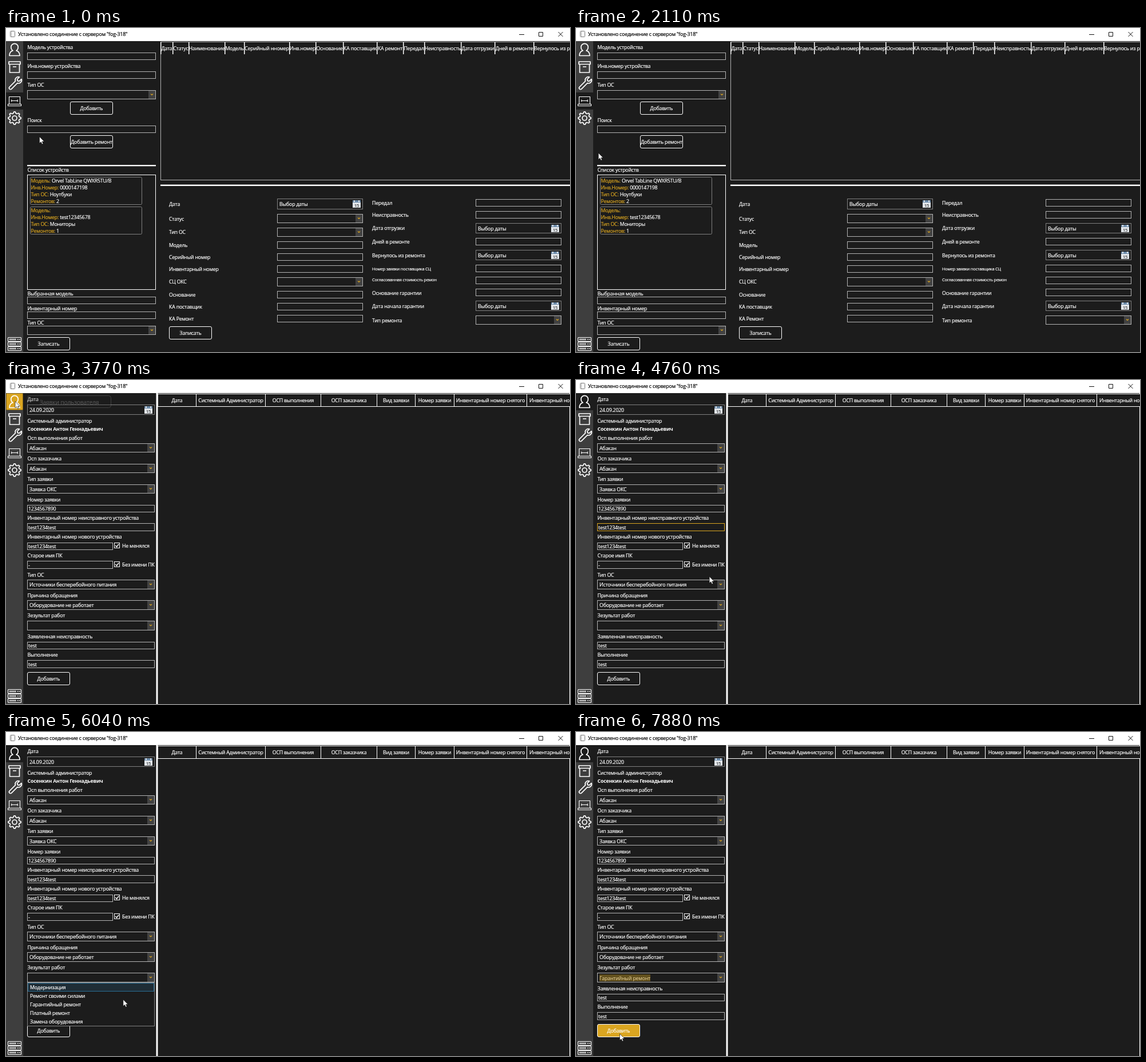
These frames come from a looping animation (986 by 568 pixels, 8000 ms). An HTML page:

```html
<!DOCTYPE html>
<html lang="ru">
<head>
<meta charset="utf-8">
<style>
html, body { margin: 0; width: 100%; height: 100%; overflow: hidden; background: #1c1c1c }
svg { display: block; font: 8.8px "Open Sans", "Noto Sans", sans-serif; letter-spacing: -.2px }
text { fill: #fff; stroke: #fff; stroke-width: .2px; white-space: pre }
.field { fill: #1c1c1c; stroke: #b4b4b4 }
.dim { fill: #1c1c1c; stroke: #808080 }
.btn { fill: #1c1c1c; stroke: #fff }
.gold { fill: #daa520; stroke: #daa520 }
.icon { fill: none; stroke: #fff; stroke-width: 1.7; stroke-linejoin: round }
.thin { stroke-width: 1.1 }
.hot { stroke: #daa520 }
.btn.hot { fill: #daa520; stroke: #fff }
.nav { fill: none }
.nav.hot { fill: #daa520; stroke: none }
</style>
</head>
<body>
<svg id="stage" width="986" height="568" viewBox="0 0 986 568"></svg>
<script>
const fill = (x, y, x2, y2, color, more = '') =>
  `<rect x="${x}" y="${y}" width="${x2 - x}" height="${y2 - y}" fill="${color}" ${more}/>`;
const frame = (x, y, x2, y2, cls = 'field', more = '') =>
  `<rect x="${x + .5}" y="${y + .5}" width="${x2 - x - 1}" height="${y2 - y - 1}" class="${cls}" ${more}/>`;
const path = (d, more = 'class="icon"') => `<path d="${d}" ${more}/>`;
// y is the vertical middle of the capitals
const text = (x, y, s, more = '') => `<text x="${x}" y="${y + 3}" ${more}>${s}</text>`;
const middle = 'text-anchor="middle"';

const input = (x, y, x2, y2, s = '') => frame(x, y, x2, y2, 'field hover') + text(x + 2, (y + y2) / 2 + .5, s);
const combo = (x, y, x2, y2, s = '') => {
  const m = (y + y2) / 2;
  return frame(x, y, x2, y2, 'field hover') + fill(x2 - 13, y + 1, x2 - 1, y2 - 1, '#424242') +
    path(`M${x2 - 9} ${m - 1.5}l2 2 2-2`, 'fill="none" stroke="#daa520" stroke-width="1.1"') + text(x + 4, m + .5, s);
};
const date = (x, y, x2, y2, s = 'Выбор даты') => {
  const cx = x2 - 18, cy = y + 3;
  return frame(x, y, x2, y2, 'dim') + fill(cx, cy, cx + 14, cy + 13, '#e2e6ea') + fill(cx, cy, cx + 14, cy + 4, '#6f8dab') +
    fill(cx + 2, cy, cx + 4, cy + 3, '#e2e6ea') + fill(cx + 10, cy, cx + 12, cy + 3, '#e2e6ea') +
    text(cx + 7, cy + 8.5, '15', middle + ' style="fill:#333;stroke:#333;font-size:7.5px"') +
    text(x + 4, (y + y2) / 2 + .5, s);
};
const button = (x, y, x2, y2, s) =>
  frame(x, y, x2, y2, 'btn hover', 'rx="2.5"') + text((x + x2) / 2, (y + y2) / 2 + .5, s, middle);
const check = (y, s) => frame(189, y, 199, y + 10, 'btn') +
  path(`M191.3 ${y + 5}l2.2 2.6 3.6-5`, 'fill="none" stroke="#fff" stroke-width="1.5"') + text(203, y + 5.5, s);
const labels = (x, list) => list.map(([y, s]) => text(x, y, s)).join('');
const headers = (edges, names, pad, cell) => names.map((s, i) => {
  const a = edges[i], b = edges[i + 1], last = i == names.length - 1;
  return cell(a, b) + text(last ? a + pad : (a + b) / 2 + .5, 35.5, s, last ? '' : middle);
}).join('');
const card = (y, rows) => frame(42, y, 238, y + 49, 'dim', 'rx="2"') +
  rows.map(([k, v], i) => text(43.5, y + 7 + i * 12, `<tspan class="gold">${k}:</tspan> ${v}`)).join('');

const gear = Array.from({ length: 32 }, (_, i) => {
  const r = (i + 1) % 4 < 2 ? 11.2 : 8.5, a = (i + .5) * Math.PI / 16;
  return (15 + r * Math.sin(a)).toFixed(1) + ' ' + (158 - r * Math.cos(a)).toFixed(1);
}).join('L');

const titleBar = fill(0, 0, 986, 23, '#fff') +
  frame(7, 5, 16, 16, '', 'rx="1" style="fill:#fff;stroke:#777"') + path('M9.5 6V15', 'stroke="#aaa"') +
  text(21, 11, 'Установлено соединение с сервером "fog-318"', 'style="fill:#000;stroke:#000"') +
  path('M897 11.5h9M931.5 7.5h7v7h-7zM965.5 7l8 8m0-8l-8 8', 'fill="none" stroke="#111"');

const icons =
  path('M6 48.5C6 43 9 40.5 12 39.6C9.4 38 8.8 35.8 8.8 33.5a6.2 6.2 0 0 1 12.4 0C21.2 35.8 20.6 38 18 39.6C21 40.5 24 43 24 48.5Z') +
  path('M5 59h20v4.5H5zM6.5 63.5V78h17V63.5M12 68h6') +
  path('M-2.5-4.5V10a2.5 2.5 0 0 0 5 0V-4.5a5.5 5.5 0 0 0 0-10V-9l-2.5 1.5-2.5-1.5v-5.5a5.5 5.5 0 0 0 0 10Z',
    'class="icon" transform="translate(15 98) rotate(45)"') +
  path('M5.5 133.5V120.5H24.5V133.5M3.5 133.5H26.5V136.500H3.5ZM9 126l1.500 1.500L9 129M10.500 127.500h8M21 126l-2 1.500 2 1.500',
    'class="icon thin"') +
  path('M' + gear + 'Z') + '<circle cx="15" cy="158" r="4" class="icon"/>' +
  [542, 550, 558].map(y => frame(3, y, 27, y + 8, 'icon thin', 'rx="1"') +
    path(`M6 ${y + 4}h12`, 'stroke="#fff" stroke-width="3" stroke-dasharray="1.2 .8"') +
    path(`M20 ${y + 4}h1.500M23 ${y + 4}h1.500`, 'stroke="#fff" stroke-width="1.500"')).join('');

const repairs = fill(0, 113, 30, 143, '#1c1c1c') +
  labels(37.5, [[33.5, 'Модель устройства'], [66.5, 'Инв.номер устройства'], [99.5, 'Тип ОС'], [161.5, 'Поиск'],
    [249, 'Список устройств'], [466, 'Выбранная модель'], [491.5, 'Инвентарный номер'], [517, 'Тип ОС']]) +
  [43, 76, 171, 471, 497].map(y => input(37, y, 262, y + 13)).join('') +
  combo(37, 109, 262, 125) + combo(37, 522, 262, 538) +
  button(112, 129, 187, 152, 'Добавить') + button(112, 188, 187, 211, 'Добавить ремонт') +
  button(37, 542, 112, 565, 'Записать') + fill(37, 240, 262, 242.3, '#fff') +
  frame(37, 257, 262, 459, 'btn') +
  card(261, [['Модель', 'Orvel TabLine QWXR5TU/B'], ['Инв.Номер', '0000147198'], ['Тип ОС', 'Ноутбуки'], ['Ремонтов', '2']]) +
  card(313, [['Модель', ''], ['Инв.Номер', 'test12345678'], ['Тип ОС', 'Мониторы'], ['Ремонтов', '1']]) +
  frame(270, 24, 990, 267) +
  headers([270, 291, 319, 382, 416, 495, 541, 589, 648, 694, 731, 795, 854, 922, 990],
    ['Дата', 'Статус', 'Наименование', 'Модель', 'Серийный нномер', 'Инв.номер', 'Основание', 'КА поставщик', 'КА ремонт',
      'Передал', 'Неисправность', 'Дата отгрузки', 'Дней в ремонте', 'Вернулось из ремонта'],
    1, a => fill(a, 25, a + 1.5, 46, '#fff')) +
  fill(270, 274.5, 986, 277, '#fff') +
  labels(285, [[309, 'Дата'], [334.5, 'Статус'], [358, 'Тип ОС'], [380.5, 'Модель'], [401.5, 'Серийный номер'],
    [423, 'Инвентарный номер'], [445, 'СЦ ОКС'], [467.5, 'Основание'], [489, 'КА поставщик'], [509.5, 'КА Ремонт']]) +
  date(474, 299, 624, 318) + [326, 350, 437].map(y => combo(474, y, 624, y + 16)).join('') +
  [374, 395, 416, 461, 482, 503].map(y => input(474, y, 624, y + 13)).join('') +
  button(285, 523, 360, 546, 'Записать') +
  labels(640, [[307, 'Передал'], [328, 'Неисправность'], [351, 'Дата отгрузки'], [375, 'Дней в ремонте'],
    [398.5, 'Вернулось из ремонта'], [464.5, 'Основание гарантии'], [488, 'Дата начала гарантии'], [513, 'Тип ремонта']]) +
  `<g style="font-size:7.4px">${labels(640, [[421.5, 'Номер заявки поставщика СЦ'], [440.5, 'Согласованная стоимость ремон']])}</g>` +
  [300, 321, 368, 415, 436, 457].map(y => input(821, y, 971, y + 13)).join('') +
  [342, 389, 478].map(y => date(821, y, 971, y + 18)).join('') + combo(821, 504, 971, 520);

const requests = fill(0, 23, 30, 53, '#1c1c1c') + frame(0, 23, 30, 53, 'nav hover') +
  labels(37.5, [[34, 'Дата'], [72, 'Системный администратор'], [102, 'Осп выполнения работ'], [138, 'Осп заказчика'],
    [174, 'Тип заявки'], [209.5, 'Номер заявки'], [242, 'Инвентарный номер неисправного устройства'],
    [275, 'Инвентарный номер нового устройства'], [308, 'Старое имя ПК'], [341.5, 'Тип ОС'], [377.5, 'Причина обращения'],
    [413, 'Зезультат работ'], [449.5, 'Заявленная неисправность'], [482, 'Выполнение']]) +
  text(37.5, 86, 'Сосенкин Антон Геннадьевич', 'font-weight="700" style="stroke:none"') +
  date(37, 43, 260, 61, '24.09.2020') +
  combo(37, 111, 260, 127, 'Абакан') + combo(37, 147, 260, 163, 'Абакан') + combo(37, 183, 260, 199, 'Заявка ОКС') +
  input(37, 219, 260, 232, '1234567890') + input(37, 251, 260, 265, 'test1234test') +
  input(37, 285, 187, 298, 'test1234test') + check(285, 'Не менялся') +
  input(37, 317, 187, 331, '-') + check(318, 'Без имени ПК') +
  combo(37, 350, 260, 367, 'Источники бесперебойного питания') + combo(37, 386, 260, 403, 'Оборудование не работает') +
  combo(37, 422, 260, 439) + input(37, 459, 260, 472, 'test') + input(37, 491, 260, 505, 'test') +
  button(37, 512, 112, 535, 'Добавить') +
  fill(262.5, 23, 265.5, 568, '#fff') + fill(985, 23, 986, 568, '#fff') +
  headers([265, 332, 453, 550, 648, 715, 783, 910, 990], ['Дата', 'Системный Администратор', 'ОСП выполнения', 'ОСП заказчика',
    'Вид заявки', 'Номер заявки', 'Инвентарный номер снятого', 'Инвентарный но'],
    5, (a, b) => frame(a, 24, b + 1, 47, 'btn')) +
  `<g id="chosen">${fill(41, 425, 130, 437, '#62501d')}${text(41, 431.5, 'Гарантийный ремонт', 'style="fill:#f0d9a0;stroke:none"')}</g>` +
  `<g id="caret">${fill(41, 425, 42, 437, '#fff')}</g>` +
  `<g id="list">${frame(37, 439, 260, 516, 'dim')}
    ${frame(38, 440, 259, 455, '', 'id="pick" style="fill:#1f2d36;stroke:#2a6f96"')}` +
  ['Модернизация', 'Ремонт своими силами', 'Гарантийный ремонт', 'Платный ремонт', 'Замена оборудования']
    .map((s, i) => text(42, 448 + i * 15, s)).join('') + '</g>' +
  `<g id="tip">${frame(37, 27, 184, 49, 'field', 'rx="4"')}${text(110.5, 39.5, 'Заявки пользователя', middle + ' style="font-size:10.3px"')}</g>`;

const stage = document.getElementById('stage');
stage.innerHTML = fill(0, 0, 986, 568, '#1c1c1c') + fill(0, 23, 30, 568, '#3e3e3e') +
  `<g id="repairs">${repairs}</g><g id="requests">${requests}</g>` + icons + titleBar +
  `<g id="cursor">${path('M0 0V11.5L2.7 9.200 4.500 13.200 6.400 12.300 4.700 8.500H8.300Z', 'fill="#fff" stroke="#000" stroke-width=".6"')}</g>`;
const el = Object.fromEntries([...stage.querySelectorAll('[id]')].map(e => [e.id, e]));
const hovers = [...el.requests.querySelectorAll('.hover')];

// time, x, y of the pointer tip
const track = [
  [0, 58.5, 190.5], [460, 58.5, 190.5], [461, 58, 190], [690, 58, 190], [850, 15, 270], [1000, 50, 385], [1130, 140, 416],
  [1280, 245, 385], [1380, 267, 335], [1450, 261, 305], [1490, 255, 291], [1700, 185, 240], [2000, 70, 220], [2150, 33, 219],
  [2290, 36, 218], [2420, 32, 180], [2640, 23, 95], [2800, 18.5, 55.5], [3030, 16, 37.5], [4140, 16, 37.5],
  [4300, 55, 60], [4480, 130, 135], [4640, 203, 258], [4760, 233, 344], [4940, 250, 407], [5180, 254, 430], [5660, 254, 430],
  [5850, 238, 450], [6040, 205, 469], [6290, 181, 478], [6480, 180.5, 478.5], [7260, 180.5, 478.5],
  [7500, 140, 502], [7700, 95, 522], [7880, 76.5, 529], [8000, 76.5, 529]];
const still = (a, b) => !a || !b || Math.hypot(a[1] - b[1], a[2] - b[2]) < 1;
const slope = (i, k) => {
  const a = track[i - 1], p = track[i], b = track[i + 1];
  return still(a, p) || still(p, b) ? 0 : (b[k] - a[k]) / (b[0] - a[0]);
};
function pointer(t) {
  const i = Math.max(0, track.findIndex(p => p[0] > t) - 1), a = track[i], b = track[i + 1];
  const d = b[0] - a[0], u = Math.max(0, (t - a[0]) / d), v = 1 - u;
  return [1, 2].map(k => a[k] * v * v * (1 + 2 * u) + b[k] * u * u * (3 - 2 * u) +
    d * u * v * (slope(i, k) * v - slope(i + 1, k) * u));
}
const show = (e, on) => e.style.display = on ? '' : 'none';

function draw() {
  const t = performance.now() % 8000, [x, y] = pointer(t);
  // highlights trail the pointer slightly
  const [hx, hy] = pointer(Math.max(0, t - 120));
  const open = t >= 5330 && t < 7060;
  show(el.repairs, t < 3710);
  show(el.requests, t >= 3710);
  show(el.list, open);
  show(el.caret, t >= 6820 && open);
  show(el.chosen, t >= 7060);
  el.pick.setAttribute('y', t < 6100 ? 440.5 : 470.5);
  for (const e of hovers) {
    const [l, top, w, h] = ['x', 'y', 'width', 'height'].map(k => e[k].baseVal.value);
    e.classList.toggle('hot', !open && hx >= l && hx <= l + w && hy >= top && hy <= top + h);
  }
  el.tip.style.opacity = t < 4200 ? Math.min(1, Math.max(0, (t - 3710) / 260)) : 0;
  el.cursor.setAttribute('transform', `translate(${x} ${y})`);
  requestAnimationFrame(draw);
}
draw();
</script>
</body>
</html>
```
